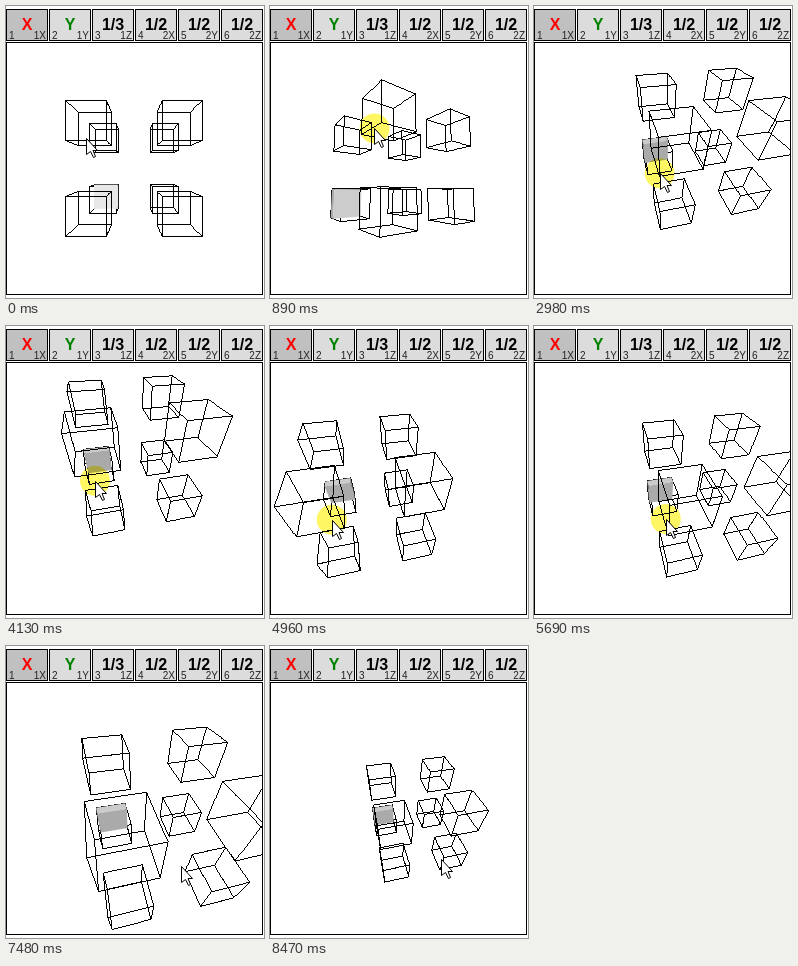
These frames come from a looping animation (258x292 px, 8.51 s). An HTML page with a canvas:

```html
<!DOCTYPE html>
<html lang="en">
<head>
<meta charset="utf-8">
<title>Eight cubes</title>
<style>
  html, body { margin: 0; width: 100%; height: 100%; overflow: hidden; background: #fff; }
  canvas { display: block; }
</style>
</head>
<body>
<canvas id="stage" width="258" height="292"></canvas>
<script>
const ctx = document.getElementById('stage').getContext('2d');
const LOOP = 8510, FOCAL = 180, HALF = 0.42, CX = 128.3, CY = 162.5;
const PRESS = 50, RELEASE = 6250;

// Eased progress from 0 to 1 between two times
function ease(t, from, to) {
  const s = Math.min(1, Math.max(0, (t - from) / (to - from)));
  return s * s * (3 - 2 * s);
}

// Yaw, pitch and twist in degrees: two swings up and down, then a turn to the resting pose
function turn(t) {
  const settle = ease(t, 1900, 2600);
  const swing = t > PRESS && t < 1800 ? 30 * Math.sin((t - PRESS) / 1750 * 4 * Math.PI) : 0;
  return [77 * ease(t, PRESS, 1800) * (1 - settle), swing + 45 * settle, 9 * settle];
}

// Key points of the drag: time, x, y in scene units
const path = [
  [2600, 0, 0], [2980, 1.02, -0.63], [3450, 1, 1], [4130, 0, -0.98], [4600, -1.15, 0.25],
  [4960, -0.757, 0.1], [5220, 0.1, 0.8], [5560, 1.2, 0.1], [RELEASE, 0.61, 0.31]
];

// Smooth curve through the key points
function pan(t) {
  const last = path.length - 1;
  if (t <= path[0][0]) return path[0].slice(1);
  if (t >= path[last][0]) return path[last].slice(1);
  const i = path.findIndex(p => p[0] > t) - 1;
  const p = path[i], q = path[i + 1], span = q[0] - p[0], s = (t - p[0]) / span;
  const slope = (n, c) => {
    if (n === 0 || n === last) return 0;
    return (path[n + 1][c] - path[n - 1][c]) / (path[n + 1][0] - path[n - 1][0]) * span;
  };
  return [1, 2].map(c => {
    const d = q[c] - p[c], a = slope(i, c), b = slope(i + 1, c);
    return p[c] + s * (a + s * (3 * d - 2 * a - b + s * (a + b - 2 * d)));
  });
}

// Wheel clicks: start, interval, signed count
const wheel = [[940, 1, -1], [6500, 61, -8], [7260, 51, 7], [8040, 86, 6]];

function distance(t) {
  return wheel.reduce((d, [start, gap, count]) => {
    const clicks = t < start ? 0 : Math.min(Math.abs(count), Math.floor((t - start) / gap) + 1);
    return d + 0.3 * Math.sign(count) * clicks;
  }, 5.16);
}

function spin(u, v, degrees) {
  const r = degrees * Math.PI / 180, c = Math.cos(r), s = Math.sin(r);
  return [u * c - v * s, u * s + v * c];
}

function rotate([x, y, z], [yaw, pitch, twist]) {
  [x, z] = spin(x, z, yaw);
  [y, z] = spin(y, z, pitch);
  [x, z] = spin(x, z, twist);
  [x, y] = spin(x, y, -twist);
  return [x, y, z];
}

// Hard-edged one pixel line
function line([x0, y0], [x1, y1]) {
  const n = Math.max(1, Math.ceil(Math.max(Math.abs(x1 - x0), Math.abs(y1 - y0))));
  for (let i = 0; i <= n; i++) {
    ctx.fillRect(Math.floor(x0 + (x1 - x0) * i / n), Math.floor(y0 + (y1 - y0) * i / n), 1, 1);
  }
}

function polygon(points) {
  ctx.beginPath();
  points.forEach(p => ctx.lineTo(p[0], p[1]));
  ctx.closePath();
  ctx.fill();
}

const corners = [...Array(8).keys()].map(i => [1, 2, 4].map(bit => i & bit ? 1 : -1));

function drawScene(t, angles, [tx, ty]) {
  const depth = distance(t);
  const toCamera = p => {
    const [x, y, z] = rotate(p, angles);
    return [x + tx, y + ty, z + depth];
  };
  const project = p => {
    const [x, y, z] = toCamera(p);
    return [CX + FOCAL * x / z, CY + FOCAL * y / z];
  };

  const drawCube = cube => {
    const pts = corners.map(c => project(c.map((v, k) => cube[k] + v * HALF)));
    ctx.fillStyle = '#000';
    for (let i = 0; i < 8; i++) {
      for (const bit of [1, 2, 4]) if (!(i & bit)) line(pts[i], pts[i | bit]);
    }
  };

  // Shaded slice at the back of a cube, visible sides only
  const drawSlice = cube => {
    const ext = [HALF, HALF, 0.12];
    const mid = [cube[0], cube[1], cube[2] + HALF - ext[2]];
    const at = s => mid.map((v, k) => v + s[k] * ext[k]);
    for (let axis = 0; axis < 3; axis++) {
      for (const side of [-1, 1]) {
        const unit = [0, 0, 0];
        unit[axis] = side;
        const n = rotate(unit, angles), view = toCamera(at(unit));
        if (n[0] * view[0] + n[1] * view[1] + n[2] * view[2] >= 0) continue;
        const g = Math.round(80 + 160 * Math.max(0, -0.95 * n[2] - 0.15 * n[1]));
        ctx.fillStyle = `rgb(${g},${g},${g})`;
        polygon([[-1, -1], [1, -1], [1, 1], [-1, 1]].map(([i, j]) => {
          const s = unit.slice();
          s[(axis + 1) % 3] = i;
          s[(axis + 2) % 3] = j;
          return project(at(s));
        }));
      }
    }
  };

  const marked = corners[6];
  drawCube(marked);
  drawSlice(marked);
  corners.filter(c => c !== marked).forEach(drawCube);
}

function box(x, y, w, h, fill) {
  ctx.fillStyle = '#000';
  ctx.fillRect(x, y, w, h);
  ctx.fillStyle = fill;
  ctx.fillRect(x + 1, y + 1, w - 2, h - 2);
}

function text(str, x, y, font, color, align) {
  ctx.font = font + ' "Liberation Sans", Arial, sans-serif';
  ctx.fillStyle = color;
  ctx.textAlign = align;
  ctx.fillText(str, x, y);
}

function drawButtons() {
  ['X', 'Y', '1/3', '1/2', '1/2', '1/2'].forEach((label, i) => {
    const x = i * 43;
    box(x, 3, 42, 32, i ? '#dcdcdc' : '#c0c0c0');
    text(label, x + 21, 24, 'bold 16px', ['#f00', '#008000'][i] || '#000', 'center');
    text(i + 1, x + 3, 33, '10px', '#222', 'left');
    text((i < 3 ? 1 : 2) + 'XYZ'[i % 3], x + 40, 33, '10px', '#222', 'right');
  });
}

function drawPointer(x, y, pressed) {
  if (pressed) {
    ctx.globalCompositeOperation = 'multiply';
    ctx.fillStyle = '#fff664';
    ctx.beginPath();
    ctx.arc(x, y, 15, 0, 7);
    ctx.fill();
    ctx.globalCompositeOperation = 'source-over';
  }
  const shape = [[0, 0], [0, 16], [4, 13], [7, 19], [9, 18], [6.5, 12], [11, 12]]
    .map(p => [p[0] + Math.round(x) + 0.5, p[1] + Math.round(y) + 0.5]);
  ctx.fillStyle = '#fff';
  polygon(shape);
  ctx.strokeStyle = '#000';
  ctx.lineWidth = 1;
  ctx.stroke();
}

function draw(now) {
  const t = now % LOOP;
  const angles = turn(t), shift = pan(t);
  ctx.fillStyle = '#fff';
  ctx.fillRect(0, 0, 258, 292);
  drawButtons();
  box(0, 36, 257, 253, '#fff');
  ctx.save();
  ctx.beginPath();
  ctx.rect(1, 37, 255, 251);
  ctx.clip();
  drawScene(t, angles, shift);
  // The pointer follows the drag, then glides aside and nudges once
  const [yaw, pitch, twist] = angles;
  const glide = ease(t, RELEASE, 6500), nudge = ease(t, 7720, 7760);
  drawPointer(
    80 + yaw * 0.676 + twist + 36 * shift[0] + 64 * glide - 4 * nudge,
    132 + pitch * 1.29 + 36 * shift[1] + 19 * glide - 7 * nudge,
    t >= PRESS && t < RELEASE
  );
  ctx.restore();
}

let start;
function frame(now) {
  start ??= now;
  draw(now - start);
  requestAnimationFrame(frame);
}
draw(0);
requestAnimationFrame(frame);
</script>
</body>
</html>
```
